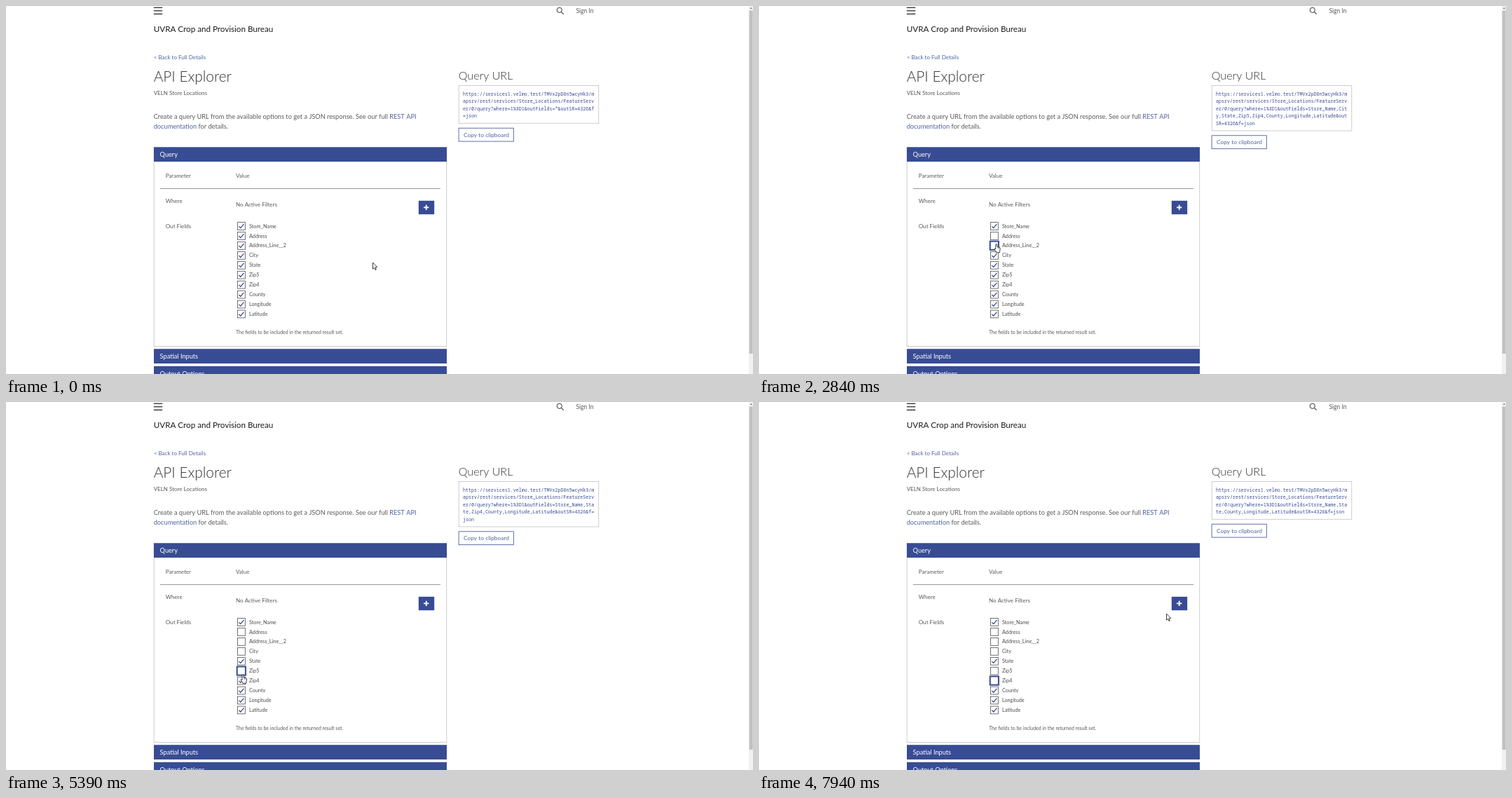
An HTML page with a canvas that plays this animation: 1066x525 px, repeating every 8000 ms.

```html
<!DOCTYPE html>
<html lang="en">
<head>
<meta charset="utf-8">
<title>API Explorer</title>
<style>
  html, body { margin: 0; width: 100%; height: 100%; overflow: hidden; background: #fff; }
  canvas { display: block; }
</style>
</head>
<body>
<canvas id="stage" width="1066" height="525"></canvas>
<script>
const ctx = document.getElementById('stage').getContext('2d');
const LOOP = 8000;
const BLUE = '#384c94', LINK = '#5062a2', INK = '#5a5a5a', LABEL = '#4c4c4c', DARK = '#1c1c1c';
const SANS = 'Lato, "Open Sans", sans-serif';
const MONO = '"Noto Sans Mono", "DejaVu Sans Mono", monospace';

const FIELDS = ['Store_Name', 'Address', 'Address_Line__2', 'City', 'State',
  'Zip5', 'Zip4', 'County', 'Longitude', 'Latitude'];
const BASE = 'https://services1.velmo.test/TMVx2pD8n5wcyHk3/mapsrv/rest/services/' +
  'Store_Locations/FeatureServer/0/query?where=1%3D1&outFields=';

// Each click: field index, press time (focus leaves), release time (box clears)
const CLICKS = [[1, 2040, 2040], [2, 2710, 2840], [3, 3530, 3660], [5, 4670, 4800], [6, 5540, 5670]];

// Pointer moves: first step, last step, step count, target x, y, easing power
const START = [523.5, 366];
const MOVES = [
  [70, 560, 8, 306, 303, 0.9],
  [630, 840, 4, 332, 328, 1],
  [910, 1050, 3, 340, 327.5, 1],
  [2170, 2380, 4, 338.7, 339, 1],
  [2970, 3460, 8, 338, 358, 1],
  [3790, 4140, 6, 337.3, 380.5, 1],
  [4930, 5140, 4, 338, 389, 1],
  [5390, 5390, 1, 338, 388.6, 1],
  [5800, 5930, 3, 335, 398.5, 1],
  [6330, 7100, 12, 437.5, 352, 1.3],
  [7170, 7940, 12, 581.5, 302, 1]
];

const ARROW = new Path2D('M0 0V9.2L2.1 7.3L3.5 10.6L4.9 10L3.5 6.8L6.3 6.5Z');
const HAND = new Path2D('M-1 1Q0-.5 1 1V4.4L4.5 5.2Q5.7 5.7 5.5 7.5L4.9 10.4V12.7H-.4' +
  'V11.4L-2.7 8.6Q-3.3 7-2 7L-1 8Z');

function text(str, x, y, size, color = INK, font = SANS, weight = 400) {
  ctx.font = `${weight} ${size}px ${font}`;
  ctx.fillStyle = color;
  ctx.fillText(str, x, y);
  return x + ctx.measureText(str).width;
}

function rect(x, y, w, h, color) {
  ctx.fillStyle = color;
  ctx.fillRect(x, y, w, h);
}

function frame(x, y, w, h, color, line = 1) {
  ctx.strokeStyle = color;
  ctx.lineWidth = line;
  ctx.strokeRect(x + line / 2, y + line / 2, w - line, h - line);
}

function lines(points, color, width) {
  ctx.strokeStyle = color;
  ctx.lineWidth = width;
  ctx.beginPath();
  points.forEach(([x, y], i) => i ? ctx.lineTo(x, y) : ctx.moveTo(x, y));
  ctx.stroke();
}

function pointerAt(t) {
  let [x, y] = START;
  for (const [from, to, steps, tx, ty, power] of MOVES) {
    if (t < from) break;
    const gap = steps > 1 ? (to - from) / (steps - 1) : 1;
    const step = Math.min(steps, Math.floor((t - from) / gap + 1e-6) + 1);
    const p = Math.pow(step / steps, power);
    x += (tx - x) * p;
    y += (ty - y) * p;
  }
  return [x, y];
}

function formAt(t) {
  const cleared = new Set();
  let focus = -1;
  for (const [field, press, release] of CLICKS) {
    if (t >= press) focus = -1;
    if (t >= release) { cleared.add(field); focus = field; }
  }
  return { cleared, focus };
}

function drawHeader() {
  for (const y of [1.7, 6.2, 10.8]) rect(210.8, y, 12.4, 1.2, DARK);
  ctx.strokeStyle = '#333';
  ctx.lineWidth = 1;
  ctx.beginPath();
  ctx.arc(789.8, 5.8, 3.6, 0, 7);
  ctx.stroke();
  lines([[792.4, 8.4], [795.6, 11.6]], '#333', 1.1);
  text('Sign In', 813.5, 9.8, 8.5);
  text('UVRA Crop and Provision Bureau', 210.7, 37.2, 11.65, DARK);
  text('< Back to Full Details', 210.7, 75.5, 8.05, LINK);
  text('API Explorer', 210.7, 108.4, 20.8, '#323232', SANS, 300);
  text('VELN Store Locations', 210.7, 126.5, 8);
  const x = text('Create a query URL from the available options to get a JSON response. See our full ',
    210.7, 161.4, 9.22);
  text('REST API', x, 161.4, 9.22, LINK);
  text(' for details.', text('documentation', 210.7, 174.9, 9.22, LINK), 174.9, 9.22);
}

function drawUrl({ cleared }) {
  const picked = cleared.size ? FIELDS.filter((_, i) => !cleared.has(i)).join(',') : '*';
  const rows = (BASE + picked + '&outSR=4326&f=json').match(/.{1,47}/g);
  const extra = (rows.length - 4) * 10.6;
  text('Query URL', 645.7, 104.6, 16.1, '#323232', SANS, 300);
  frame(645.8, 113, 200.4, 54.8 + extra, '#c8c8c8', 0.9);
  rows.forEach((row, i) => text(row, 652, 127.5 + i * 10.6, 6.65, BLUE, MONO));
  const top = 173.8 + extra;
  frame(645.7, top, 79, 19.7, BLUE, 0.8);
  text('Copy to clipboard', 653, top + 12.8, 8.4, LINK);
}

function drawCheckbox(i, checked, focused) {
  const y = 314 + i * 13.94;
  if (focused) frame(328.7, y - 7.2, 14.2, 14.2, BLUE, 2);
  else frame(330.1, y - 5.8, 11.6, 11.6, LABEL, 0.8);
  if (checked) lines([[332.4, y + 0.3], [334.7, y + 2.7], [339.4, y - 2.8]], '#2d3f86', 1.2);
  text(FIELDS[i], 347, y + 2.6, 7.25, LABEL);
}

function drawPanel({ cleared, focus }) {
  frame(210.7, 201, 418.5, 285, '#c8c8c8', 0.9);
  const bars = [['Query', 201.4, 20.7], ['Spatial Inputs', 489.2, 20.8], ['Output Options', 513.8, 20.8]];
  for (const [label, y, h] of bars) {
    rect(211, y, 418, h, BLUE);
    text(label, 219.6, y + 13.8, 9.2, '#fff');
  }
  text('Parameter', 227.7, 245, 8);
  text('Value', 328, 245, 8);
  rect(220, 260, 400, 0.9, '#8e8e8e');
  text('Where', 227.7, 280.7, 8);
  text('No Active Filters', 328, 286.4, 8.05);
  rect(588.8, 277.8, 22.4, 19.4, BLUE);
  rect(596, 286.5, 7.4, 1.8, '#fff');
  rect(598.8, 283.7, 1.8, 7.4, '#fff');
  text('Out Fields', 227.7, 317, 8.1);
  FIELDS.forEach((_, i) => drawCheckbox(i, !cleared.has(i), focus === i));
  text('The fields to be included in the returned result set.', 328, 468.4, 6.95);
}

function drawScrollbar() {
  rect(1060, 0, 6, 525, '#f1f1f1');
  rect(1060.6, 6.5, 5, 489.5, '#c1c1c1');
  ctx.fillStyle = '#777';
  ctx.beginPath();
  ctx.moveTo(1061.6, 4);
  ctx.lineTo(1063.3, 2);
  ctx.lineTo(1065, 4);
  ctx.fill();
}

function drawPointer(t) {
  const [x, y] = pointerAt(t);
  const onField = x > 329 && x < 372 && y > 308 && y < 447;
  const shape = onField ? HAND : ARROW;
  ctx.save();
  ctx.translate(x, y);
  ctx.fillStyle = '#fff';
  ctx.fill(shape);
  ctx.strokeStyle = '#111';
  ctx.lineWidth = 0.8;
  ctx.stroke(shape);
  if (onField) {
    lines([[2.4, 5], [2.4, 7.2]], '#111', 0.5);
    lines([[4, 5.4], [4, 7.4]], '#111', 0.5);
  }
  ctx.restore();
}

function draw() {
  const t = performance.now() % LOOP;
  const form = formAt(t);
  rect(0, 0, 1066, 525, '#fff');
  drawHeader();
  drawUrl(form);
  drawPanel(form);
  drawScrollbar();
  drawPointer(t);
  requestAnimationFrame(draw);
}
draw();
</script>
</body>
</html>
```
